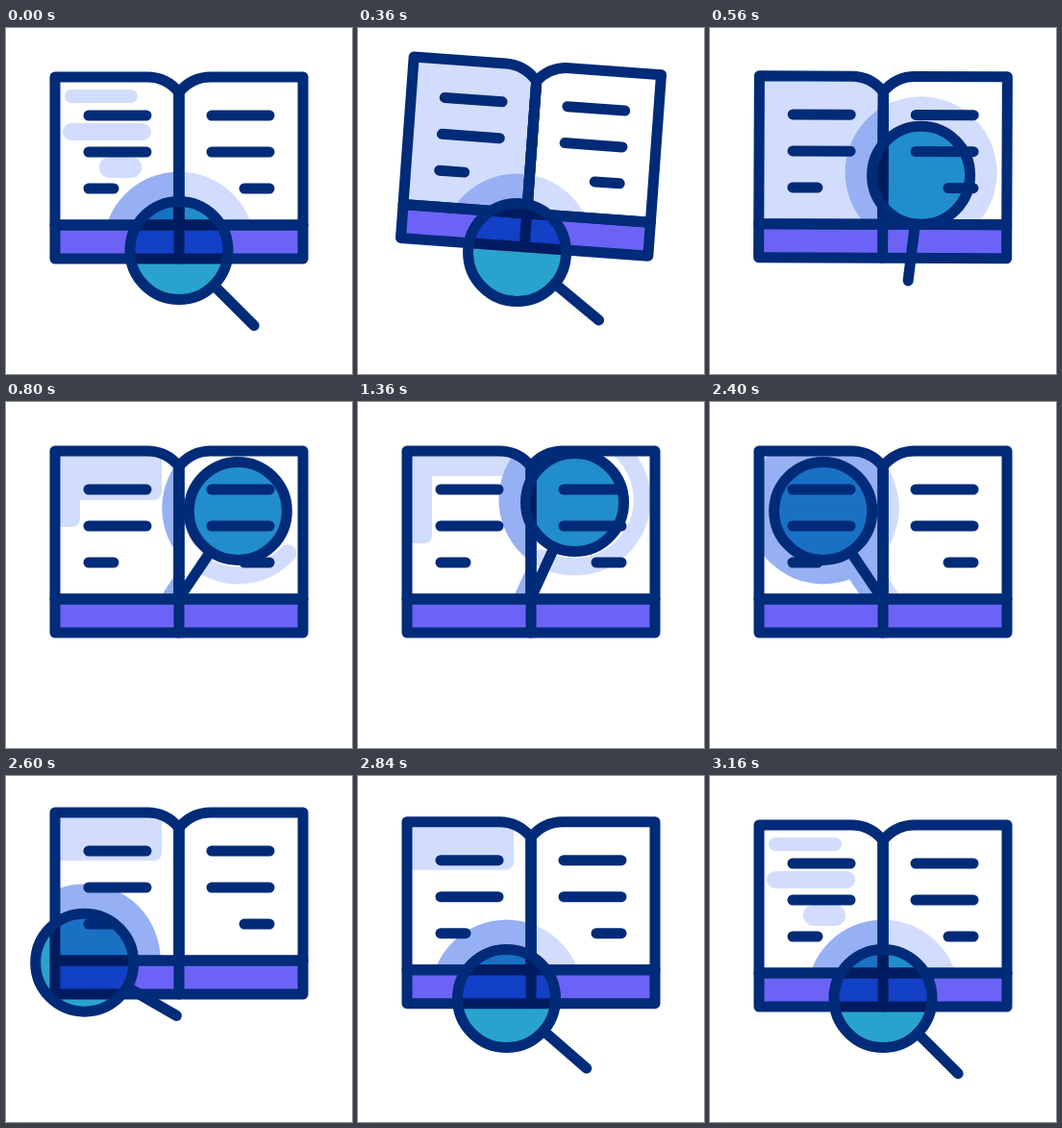
An HTML page with a canvas that plays this animation: 360x360 px, repeating every 3240 ms.

```html
<!DOCTYPE html>
<html lang="en">
<head>
<meta charset="utf-8">
<title>Book and magnifier</title>
<style>
  html, body { margin: 0; width: 100%; height: 100%; overflow: hidden; background: #fff; }
  canvas { display: block; width: 100%; height: 100%; }
</style>
</head>
<body>
<canvas id="stage"></canvas>
<script>
const LOOP = 3240, STEP = 40, SIZE = 360, PEN = 11;
const INK = '#002b78', PURPLE = '#6c63f6', TINT = '#d2dcfd', DEEP = '#96b0f3', TEAL = '#29a3ce';
const RING = 51, HALO = 79, REACH = 110.5, SWING = 34;
const PIVOT = { x: 179.5, y: 205 };
const REST = { x: 180, y: 231.5, dir: 45 };

const canvas = document.getElementById('stage');
const ctx = canvas.getContext('2d');

const rad = deg => deg * Math.PI / 180;
const mix = (a, b, p) => a + (b - a) * p;
const clamp = p => Math.min(1, Math.max(0, p));

function ease(t, from, to) {
  const p = clamp((t - from) / (to - from));
  return p * p * (3 - 2 * p);
}

// rises from a to b and falls back by c
const hop = (t, a, b, c) => ease(t, a, b) - ease(t, b, c);

function bookAt(t) {
  const tip = hop(t, 0, 320, 600);
  return { lift: 12.6 * tip + 13 * hop(t, 2400, 2600, 2960), tilt: 4.4 * tip };
}

// lens held upright on the pivot, leaning by an angle
const leaning = deg => ({
  x: PIVOT.x + REACH * Math.sin(rad(deg)),
  y: PIVOT.y - REACH * Math.cos(rad(deg)),
  dir: 90 + deg
});

function lensAt(t) {
  if (t < 1200) {
    const to = leaning(SWING), p = ease(t, 340, 700), back = hop(t, 0, 360, 600);
    return {
      x: mix(REST.x, to.x, p) - 15 * back,
      y: mix(REST.y, to.y, p) + 3 * back,
      dir: mix(REST.dir, to.dir, p) - 6 * back
    };
  }
  if (t < 2400) return leaning(SWING * Math.cos(Math.PI * clamp((t - 1200) / 660)));
  const from = leaning(-SWING), p = ease(t, 2600, 2960), out = hop(t, 2400, 2600, 2960);
  return {
    x: mix(from.x, REST.x, p) - 36 * out,
    y: mix(from.y, REST.y, ease(t, 2400, 2720)),
    dir: mix(from.dir, REST.dir, p) - 26 * out
  };
}

function line(x1, y1, x2, y2, color = INK, width = PEN) {
  ctx.beginPath();
  ctx.moveTo(x1, y1);
  ctx.lineTo(x2, y2);
  ctx.lineWidth = width;
  ctx.strokeStyle = color;
  ctx.stroke();
}

function arc(x, y, r, color, width, from = 0, to = 360) {
  ctx.beginPath();
  ctx.arc(x, y, r, rad(from), rad(to));
  ctx.lineWidth = width;
  ctx.strokeStyle = color;
  ctx.stroke();
}

function disc(x, y, r, color) {
  ctx.beginPath();
  ctx.arc(x, y, r, 0, 2 * Math.PI);
  ctx.fillStyle = color;
  ctx.fill();
}

function pagePath(side) {
  const x = d => 180 + side * d;
  const p = new Path2D();
  p.moveTo(x(0), 205);
  p.lineTo(x(129), 205);
  p.lineTo(x(129), 51);
  p.lineTo(x(33), 51);
  p.bezierCurveTo(x(21), 51, x(9), 56, x(0), 67);
  p.closePath();
  return p;
}
const LEFT = pagePath(-1), RIGHT = pagePath(1);

function inBook(pose, paint) {
  ctx.save();
  ctx.translate(180, 145.5 - pose.lift);
  ctx.rotate(rad(pose.tilt));
  ctx.translate(-180, -145.5);
  paint();
  ctx.restore();
}

// clips to a page of the moving book, then paints in stage space
function onPage(pose, page, paint) {
  ctx.save();
  const stage = ctx.getTransform();
  ctx.translate(180, 145.5 - pose.lift);
  ctx.rotate(rad(pose.tilt));
  ctx.translate(-180, -145.5);
  ctx.clip(page);
  ctx.setTransform(stage);
  paint();
  ctx.restore();
}

// an L of shade: a block along the top and a column down the edge
function shade(block, column) {
  ctx.fillStyle = TINT;
  ctx.beginPath();
  ctx.roundRect(50, 50, 112, block + 7, 8);
  ctx.roundRect(50, 50, 27, column + 7, 8);
  ctx.fill();
}

function shadeLeft(t) {
  if (t >= STEP && t < 600) {
    ctx.fillStyle = TINT;
    ctx.fill(LEFT);
  } else if (t < STEP || t >= 2960) {
    for (let i = 0; i < 3; i++) {
      line(68 + 20 * i * (i - 1), 71 + 37 * i, 130 + 12 * i * (2 - i), 71 + 37 * i, TINT, 14 + 4 * i);
    }
  } else if (t < 1200) shade(45, 73);
  else if (t < 1720) shade(20, 90);
  else if (t >= 2400) shade(44, 22);
}

function halo(lens, end, color) {
  line(lens.x, lens.y, end.x, end.y, color, 34);
  disc(lens.x, lens.y - 3, HALO, color);
}

function haloRight(t, lens, end) {
  if (t < 640 || t >= 1720) return halo(lens, end, TINT);
  disc(lens.x, lens.y, RING, TINT);
  arc(lens.x, lens.y - 3, HALO - 9, TINT, 18, t < 1200 ? 42 : -48, 120);
}

function cover() {
  ctx.fillStyle = PURPLE;
  ctx.fillRect(51, 205, 258, 35);
  ctx.lineWidth = PEN;
  ctx.strokeStyle = INK;
  ctx.stroke(LEFT);
  ctx.stroke(RIGHT);
  ctx.strokeRect(51, 205, 258, 35);
  line(180, 67, 180, 240);
}

function textLines() {
  for (let row = 0; row < 3; row++) {
    const y = 91 + 38 * row, cut = row === 2 ? 34 : 0;
    line(86, y, 146 - cut, y);
    line(214 + cut, y, 274, y);
  }
}

function draw(t) {
  const pose = bookAt(t), lens = lensAt(t);
  const along = r => ({
    x: lens.x + r * Math.cos(rad(lens.dir)),
    y: lens.y + r * Math.sin(rad(lens.dir))
  });
  const grip = along(RING), end = along(REACH);

  ctx.fillStyle = '#fff';
  ctx.fillRect(0, 0, SIZE, SIZE);
  ctx.lineCap = ctx.lineJoin = 'round';

  onPage(pose, LEFT, () => {
    inBook(pose, () => shadeLeft(t));
    halo(lens, end, DEEP);
  });
  onPage(pose, RIGHT, () => haloRight(t, lens, end));
  inBook(pose, cover);

  ctx.globalCompositeOperation = 'multiply';
  disc(lens.x, lens.y, RING, TEAL);
  ctx.globalCompositeOperation = 'source-over';

  inBook(pose, textLines);
  arc(lens.x, lens.y, RING, INK, PEN);
  line(grip.x, grip.y, end.x, end.y);
}

function fit() {
  const dpr = window.devicePixelRatio || 1;
  canvas.width = Math.round(innerWidth * dpr);
  canvas.height = Math.round(innerHeight * dpr);
  ctx.setTransform(canvas.width / SIZE, 0, 0, canvas.height / SIZE, 0, 0);
}

const start = performance.now();
function frame() {
  const t = Math.max(0, performance.now() - start) % LOOP;
  draw(Math.floor(t / STEP) * STEP);
  requestAnimationFrame(frame);
}
addEventListener('resize', fit);
fit();
frame();
</script>
</body>
</html>
```
